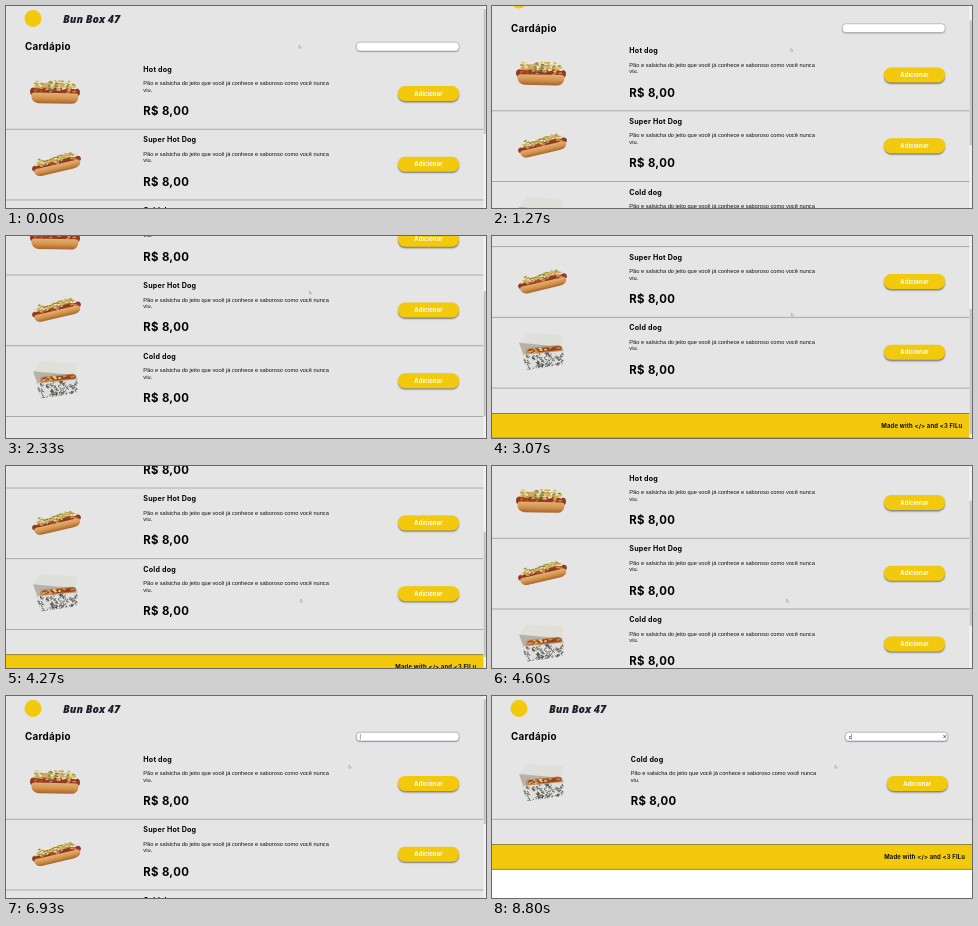
An HTML page with a canvas for the animation above (9.07 s loop, 480 by 202 pixels).

```html
<!DOCTYPE html>
<html lang="pt-BR">
<head>
<meta charset="utf-8">
<title>Cardápio</title>
<style>
html, body { margin: 0; width: 100%; height: 100%; overflow: hidden; background: #fff; }
canvas { display: block; width: 100vw; height: 100vh; }
</style>
</head>
<body>
<canvas id="stage"></canvas>
<script>
const W = 480, H = 202, LOOP = 9070, STEP = 70.7, MAX_SCROLL = 113.2;
const canvas = document.getElementById('stage');
const ctx = canvas.getContext('2d');
const BODY = '"Liberation Sans", Arial, sans-serif';
const YELLOW = '#f2c90c', GREY = '#e5e5e5';

const CLICK = 5860;
const QUERY = 'cold';
// Four key presses, then three deletions
const PRESSES = [7270, 7530, 7600, 7670, 8330, 8530, 8670];
// Pointer stops: time, x, y
const STOPS = [[640, 293, 39], [1930, 305, 46], [3070, 299.5, 77], [3870, 294.5, 133],
  [5000, 294.5, 133], [5750, 374, 41], [6000, 374, 41], [6600, 343, 69]];

function ease(t, from, to) {
  const p = Math.min(1, Math.max(0, (t - from) / (to - from)));
  return p * p * (3 - 2 * p);
}

function scrollAt(t) {
  return MAX_SCROLL * (ease(t, 615, 3180) - ease(t, 4070, 5066));
}

function pointerAt(t) {
  let [last, x, y] = STOPS[0];
  for (const [time, nx, ny] of STOPS.slice(1)) {
    const p = ease(t, last, time);
    x += (nx - x) * p;
    y += (ny - y) * p;
    last = time;
  }
  return [x, y];
}

function typedAt(t) {
  const count = PRESSES.filter(press => t >= press).length;
  return QUERY.slice(0, QUERY.length - Math.abs(QUERY.length - count));
}

function caretOn(t) {
  const last = [CLICK, ...PRESSES].filter(press => t >= press).pop();
  return last !== undefined && (t - last) % 1000 < 480;
}

function random(seed) {
  return () => (seed = (seed * 16807) % 2147483647) / 2147483647;
}

function text(str, x, y, font, color = '#000', align = 'left') {
  ctx.font = font;
  ctx.fillStyle = color;
  ctx.textAlign = align;
  ctx.fillText(str, x, y);
}

function bold(str, x, y, size, color, align) {
  ctx.save();
  ctx.letterSpacing = size * .03 + 'px';
  text(str, x, y, `700 ${size}px Inter, sans-serif`, color, align);
  ctx.restore();
}

function rect(x, y, w, h, color) {
  ctx.fillStyle = color;
  ctx.fillRect(x, y, w, h);
}

function pill(x, y, w, h, r, color) {
  ctx.beginPath();
  ctx.roundRect(x, y, w, h, r);
  ctx.fillStyle = color;
  ctx.fill();
}

function poly(points, color) {
  ctx.beginPath();
  points.forEach(([x, y]) => ctx.lineTo(x, y));
  ctx.closePath();
  ctx.fillStyle = color;
  ctx.fill();
}

function oval(x, y, rx, ry, color) {
  ctx.beginPath();
  ctx.ellipse(x, y, rx, ry, 0, 0, 7);
  ctx.fillStyle = color;
  ctx.fill();
}

function shadow(dy, blur, color) {
  const ratio = canvas.width / W;
  ctx.shadowOffsetY = dy * ratio;
  ctx.shadowBlur = blur * ratio;
  ctx.shadowColor = color;
}

function place(x, y, angle, sx, sy, paint) {
  ctx.save();
  ctx.translate(x, y);
  ctx.rotate(angle);
  ctx.scale(sx, sy);
  paint();
  ctx.restore();
}

function sprinkle(seed, count, x, y, w, h, colors) {
  const rnd = random(seed);
  for (let i = 0; i < count; i++) {
    oval(x + w * rnd(), y + h * rnd(), 1 + rnd(), .6 + .6 * rnd(), colors[i % colors.length]);
  }
}

function bunDog(seed) {
  pill(-21, -9, 42, 12, 6, '#d6a765');
  pill(-25, -4, 50, 8, 4, '#8f3a22');
  sprinkle(seed, 75, -20, -11, 40, 9, ['#e8dcae', '#a3a548', '#f3ecd2', '#dcb648', '#74813a']);
  sprinkle(seed + 1, 14, -20, -2, 40, 3, ['#b5482c', '#d98a4e']);
  const bun = ctx.createLinearGradient(0, 0, 0, 12);
  bun.addColorStop(0, '#e6b878');
  bun.addColorStop(.55, '#d2914c');
  bun.addColorStop(1, '#a0602a');
  pill(-23.5, 1, 47, 10.5, [3, 3, 7, 7], bun);
}

function boxDog() {
  poly([[-23, -9], [-15, -19], [21, -17], [20, -4]], '#e0e0da');
  poly([[-23, -9], [20, -5], [22, 0], [-18, 5]], '#b4b3ab');
  place(1, -1, -.1, 1, 1, () => {
    pill(-17, -4, 36, 8, 4, '#c48a50');
    pill(-15, -3, 34, 4, 2, '#95482a');
    sprinkle(5, 24, -13, -3, 30, 4, ['#e4c987', '#cf8a43', '#7d3f1f']);
  });
  poly([[-20, 3], [22, -1], [21, 13], [-15, 18]], '#dededb');
  ctx.save();
  ctx.clip();
  const rnd = random(77);
  ctx.lineWidth = .7;
  ctx.strokeStyle = '#383838';
  for (let i = 0; i < 90; i++) {
    const start = rnd() * 6;
    ctx.beginPath();
    ctx.arc(-20 + 42 * rnd(), 19 * rnd(), .6 + rnd(), start, start + 4);
    ctx.stroke();
  }
  ctx.restore();
}

const MENU = [
  ['Hot dog', () => place(49, 86, .02, 1, 1, () => bunDog(11))],
  ['Super Hot Dog', () => place(50.5, 87, -.23, 1, .74, () => bunDog(29))],
  ['Cold dog', () => place(50, 87, 0, 1, 1, boxDog)]
];

function card([name, picture], row, wide) {
  const x = 137.3 + wide * .5, right = 453 + wide;
  const font = `5.67px ${BODY}`;
  ctx.save();
  ctx.translate(0, row * STEP);
  picture();
  bold(name, x, 65.7, 7.1);
  text('Pão e salsicha do jeito que você já conhece e saboroso como você nunca', x, 79.2, font, '#111');
  text('viu.', x, 85.5, font, '#111');
  bold('R$ 8,00', x, 109, 11.35);
  ctx.save();
  shadow(1.4, 1.6, 'rgba(0,0,0,.45)');
  pill(right - 61, 80, 61, 15, 7, YELLOW);
  ctx.restore();
  bold('Adicionar', right - 30.5, 89.5, 5.7, '#fff', 'center');
  rect(0, 122.8, W, .9, '#a3a3a8');
  ctx.restore();
}

function search(t, typed, wide) {
  const x = 350.3 + wide;
  ctx.save();
  shadow(.8, 1.2, 'rgba(0,0,0,.4)');
  pill(x, 36.2, 102.8, 8.8, 3.6, '#fff');
  ctx.restore();
  ctx.lineWidth = .6;
  ctx.strokeStyle = t >= CLICK ? '#8a90b2' : '#a0a0a4';
  ctx.stroke();
  text(typed, x + 3.8, 42.5, `4.73px ${BODY}`);
  if (caretOn(t)) rect(x + 3.6 + ctx.measureText(typed).width, 37.8, .5, 5.8, '#444');
  if (typed) text('×', x + 99.6, 43.2, `7px ${BODY}`, '#26304a', 'center');
}

function footer(y, wide) {
  rect(0, y, W, 25.3, YELLOW);
  rect(0, y, W, .7, '#6f6531');
  rect(0, y + 24.7, W, .7, '#6f6531');
  bold('Made with </> and <3 FILu', 470.3 + wide, y + 14.8, 5.9, '#111', 'right');
}

function scrollbar(scroll) {
  rect(477.4, 0, 2.6, H, '#f1f1f1');
  rect(477.7, 3 + scroll * .62, 2, 125, '#c1c1c1');
}

function pointer(x, y) {
  place(x, y, 0, .65, .65, () => {
    poly([[0, 0], [0, 4.8], [1.9, 5.4], [1.9, 3.5], [3.4, 3.5]], '#f4f4f4');
    ctx.lineWidth = .6;
    ctx.strokeStyle = '#777';
    ctx.stroke();
  });
}

function draw(t) {
  const typed = typedAt(t);
  const items = typed ? MENU.slice(2) : MENU;
  const wide = typed ? 2.8 : 0;
  const scroll = scrollAt(t);
  const end = 123 + (items.length - 1) * STEP + 25.2;

  rect(0, 0, W, H, '#fff');
  ctx.save();
  ctx.translate(0, -scroll);
  rect(0, 0, W, end, GREY);
  oval(27, 12.5, 8.5, 8.5, YELLOW);
  text('Bun Box 47', 57, 17, 'italic 800 10.7px "Open Sans", sans-serif', '#23202b');
  bold('Cardápio', 19, 44, 9.8);
  search(t, typed, wide);
  items.forEach((item, i) => card(item, i, wide));
  footer(end, wide);
  ctx.restore();
  if (!typed) scrollbar(scroll);
  pointer(...pointerAt(t));
}

function resize() {
  const dpr = window.devicePixelRatio || 1;
  canvas.width = Math.round(innerWidth * dpr) || W;
  canvas.height = Math.round(innerHeight * dpr) || H;
}

function frame() {
  ctx.setTransform(canvas.width / W, 0, 0, canvas.height / H, 0, 0);
  draw(performance.now() % LOOP);
  requestAnimationFrame(frame);
}

addEventListener('resize', resize);
resize();
frame();
</script>
</body>
</html>
```
